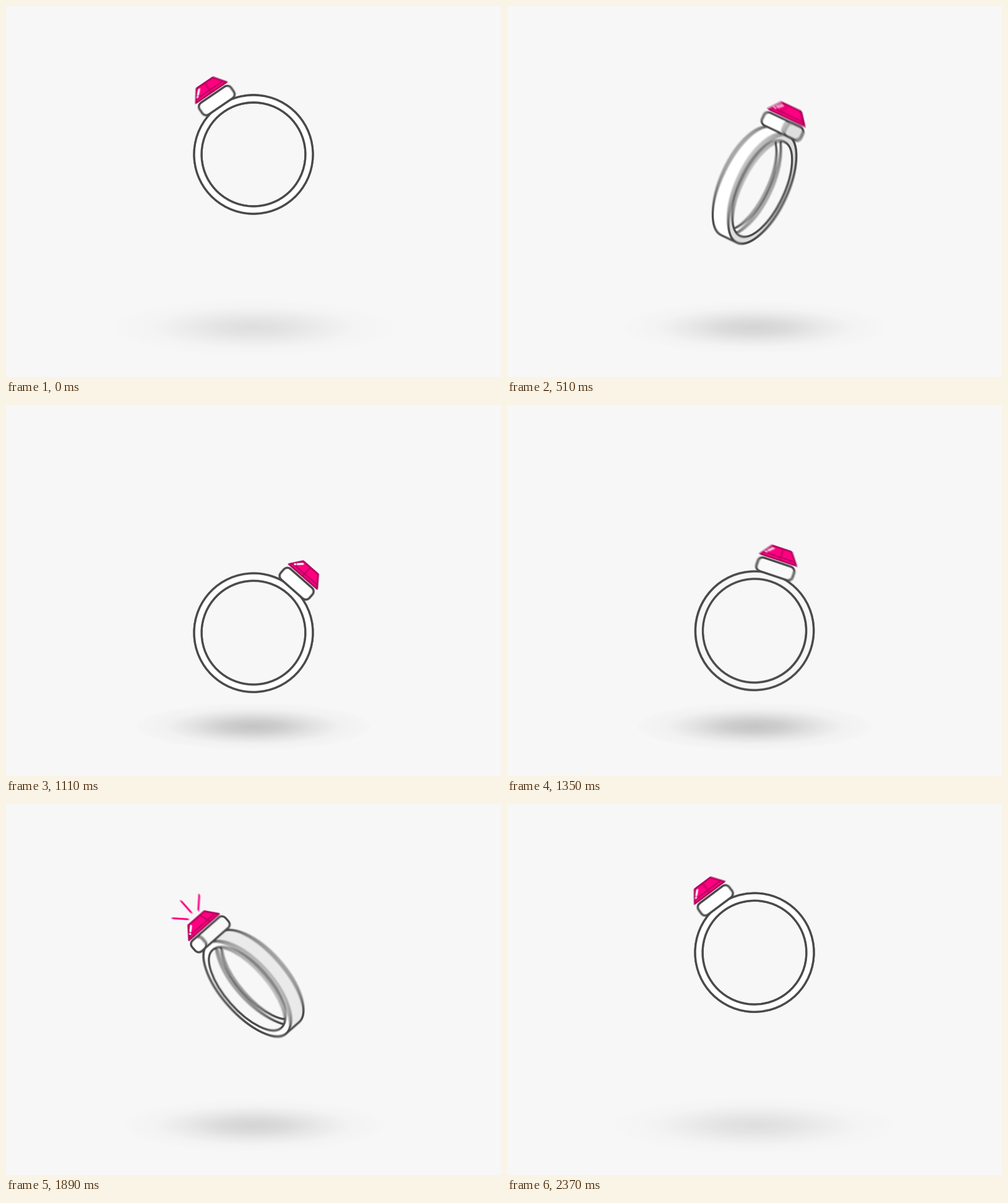
Animation, 800 px wide and 600 px high, one loop 2400 ms. Source, as an HTML page with a canvas:

```html
<!DOCTYPE html>
<html lang="en">
<head>
<meta charset="utf-8">
<title>Spinning ring</title>
<style>
  html, body { margin: 0; width: 100%; height: 100%; overflow: hidden; background: #f7f7f7; }
  canvas { display: block; width: 800px; height: 600px; }
</style>
</head>
<body>
<canvas id="stage" width="800" height="600"></canvas>
<script>
const LOOP = 2400, HALF = LOOP / 2, STEP = 30;
const SHUTTER = 18, SAMPLES = 10;
const BG = '#f7f7f7', LINE = '#4a4a4a', PINK = '#ff0080', DARK = '#b3075f';
const TAU = Math.PI * 2;

const out = document.getElementById('stage').getContext('2d');
const buffer = document.createElement('canvas');
buffer.width = 800;
buffer.height = 600;
const g = buffer.getContext('2d');

const wrap = (v, n) => ((v % n) + n) % n;
const easeQuad = u => u < 0.5 ? 2 * u * u : 1 - 2 * (1 - u) * (1 - u);

// Surfaces turned to the right of the viewer fall into shade.
function shade(angle, k = 1) {
  const v = Math.round(255 - 36 * k * Math.pow(Math.max(0, Math.sin(angle)), 0.7));
  return `rgb(${v},${v},${v})`;
}

function spin(t) {
  const u = wrap(t, HALF) / HALF;
  const angle = Math.PI * easeQuad(u);
  const first = u < 0.5;
  return {
    u, angle,
    c: Math.abs(Math.cos(angle)),
    side: first ? 1 : -1,
    face: first ? angle : 0,
    band: first ? 0 : angle - Math.PI / 2
  };
}

function paint(fill, stroke, width, rule = 'nonzero') {
  if (fill) { g.fillStyle = fill; g.fill(rule); }
  if (stroke) { g.strokeStyle = stroke; g.lineWidth = width; g.stroke(); }
}

function line(x1, y1, x2, y2, color, width) {
  g.beginPath();
  g.moveTo(x1, y1);
  g.lineTo(x2, y2);
  paint(null, color, width);
}

function shadow(low) {
  const grad = g.createRadialGradient(0, 0, 0, 0, 0, 1);
  const alpha = 0.1 + 0.108 * low;
  [1, 0.8, 0.42, 0.12, 0.03].forEach((a, i) =>
    grad.addColorStop(i / 4, `rgba(0,0,0,${a * alpha})`));
  const w = 225 - 37 * low;
  g.save();
  g.translate(400, 520);
  g.scale(w, w * 0.2);
  g.beginPath();
  g.arc(0, 0, 1, 0, TAU);
  paint(grad);
  g.restore();
}

function band(s) {
  const R = 96, r = 84;
  const shift = 24 * (1 - s.c), front = s.side * shift;
  const oval = (x, rad) => {
    g.moveTo(x + rad * s.c, 0);
    g.ellipse(x, 0, rad * s.c, rad, 0, 0, TAU);
  };
  const hoop = (x, fill) => {
    g.beginPath();
    oval(x, R);
    oval(x, r);
    paint(fill, LINE, 3.3, 'evenodd');
  };
  const wall = shade(s.band);

  g.beginPath();
  g.ellipse(-shift, 0, R * s.c, R, 0, Math.PI / 2, Math.PI * 1.5);
  g.ellipse(shift, 0, R * s.c, R, 0, -Math.PI / 2, Math.PI / 2);
  g.closePath();
  paint(wall, LINE, 3.3);

  // The far hoop shows through the hole of the near one.
  g.save();
  g.beginPath();
  oval(front, r);
  g.clip();
  paint(BG);
  hoop(-front, wall);
  g.restore();

  hoop(front, shade(s.face));
}

function box(x, w, fill) {
  g.beginPath();
  g.roundRect(x - w / 2, -116.8, w, 22.6, Math.min(7.5, w / 2));
  paint(fill, LINE, 3.3);
}

function setting(s) {
  const w = 61.5 * s.c, d = 77 * (1 - s.c);
  box(0, w + d, shade(s.band, 0.4));
  box(s.side * d / 2, w, shade(s.face));
}

function gem(s) {
  const k = 1 + 0.1 * Math.abs(Math.sin(2 * s.angle));
  const top = 16 * k, base = 30 * k;
  const outline = new Path2D(
    `M${-base} -121L${-top} -140L${top} -140L${base} -121Z`);
  g.fillStyle = PINK;
  g.fill(outline);
  for (let i = -2; i <= 1; i++) {
    const a = s.angle + i * Math.PI / 2;
    if (Math.cos(a) > 0.02) {
      const x = Math.sin(a);
      line(top * x, -140, base * x, -122, DARK, 2);
    }
  }
  line(-base * 0.86, -126, base * 0.86, -126, DARK, 2);
  g.strokeStyle = DARK;
  g.lineWidth = 2.8;
  g.stroke(outline);
  line(-19.5 * k, -130.5, -13.5 * k, -136.3, '#fff', 3.3);
  line(-22.5 * k, -127.5, -22.4 * k, -127.6, '#fff', 3.5);
}

function sparks(u) {
  const p = (u - 0.48) / 0.26;
  if (p <= 0 || p >= 1) return;
  const far = 48 * (1 - Math.pow(1 - p, 4));
  const near = Math.min(far, 48 * Math.pow(p, 1.1));
  for (const a of [-Math.PI / 4, 0, Math.PI / 4]) {
    const x = Math.sin(a), y = -Math.cos(a);
    line(near * x, -136.5 + near * y, far * x, -136.5 + far * y, PINK, 3);
  }
}

function scene(t) {
  const low = (1 - Math.cos(TAU * t / LOOP)) / 2;
  const tilt = 48.5 * Math.cos(TAU * (t - 900) / LOOP) * Math.PI / 180;
  const s = spin(t);
  g.fillStyle = BG;
  g.fillRect(0, 0, 800, 600);
  shadow(low);
  g.save();
  g.translate(400, 240 + 130 * low);
  g.rotate(tilt);
  g.lineCap = g.lineJoin = 'round';
  band(s);
  sparks(s.u);
  gem(s);
  setting(spin(t - 18));
  g.restore();
}

// Average several moments of the open shutter for motion blur.
function expose(t) {
  for (let i = 0; i < SAMPLES; i++) {
    scene(t + SHUTTER * ((i + 0.5) / SAMPLES - 0.5));
    out.globalAlpha = 1 / (i + 1);
    out.drawImage(buffer, 0, 0);
  }
}

let shown = -1;
function tick() {
  const t = Math.floor(performance.now() % LOOP / STEP) * STEP;
  if (t !== shown) expose(shown = t);
  requestAnimationFrame(tick);
}
tick();
</script>
</body>
</html>
```
